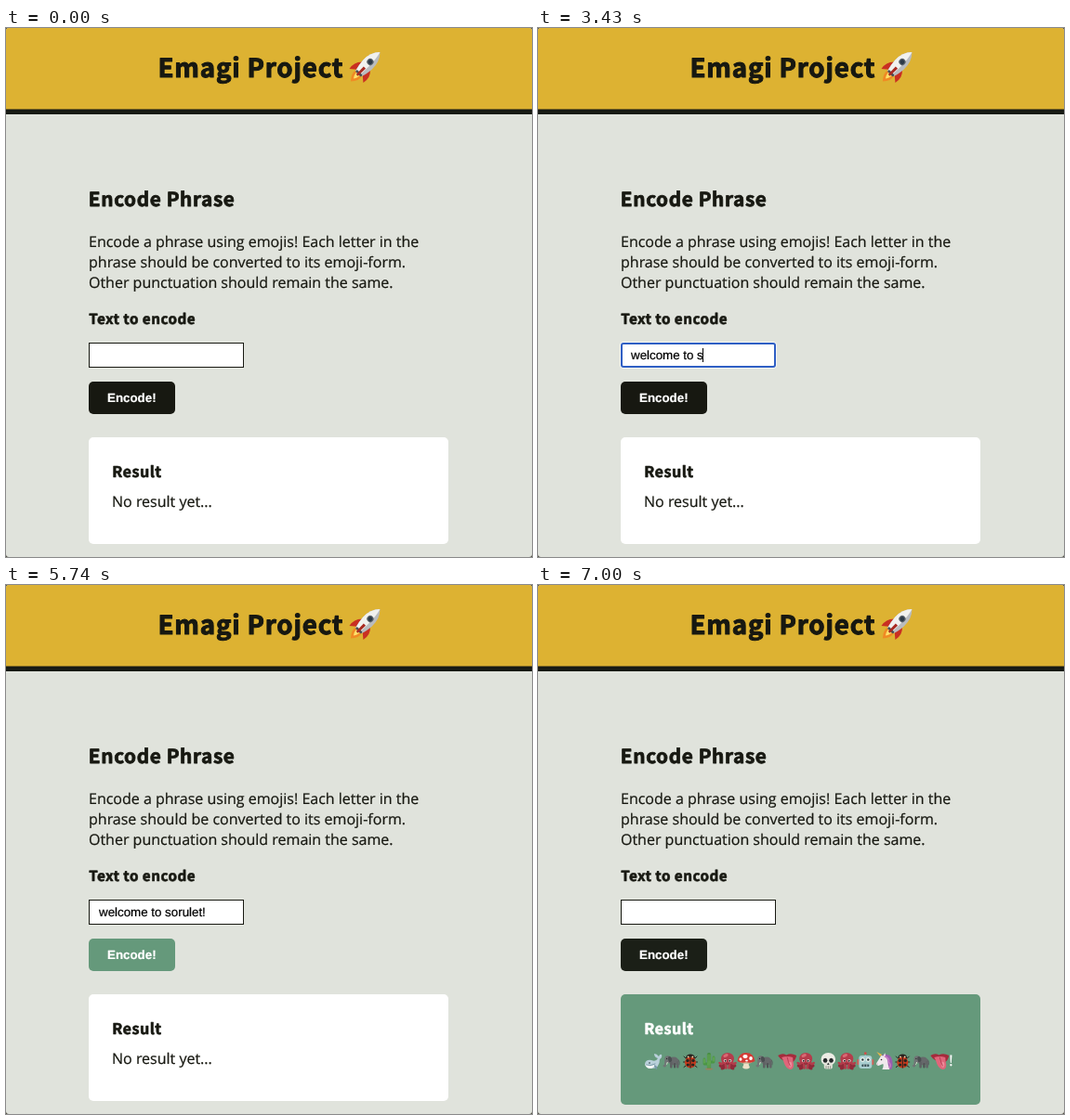
Recreate the animation shown at these times as an HTML page with a canvas. Size 566x570 px, loop 7.63 s.

```html
<!DOCTYPE html>
<html lang="en">
<head>
<meta charset="utf-8">
<title>Emagi Project</title>
<style>
  html, body { margin: 0; width: 100%; height: 100%; overflow: hidden; background: #e0e3dc; }
  canvas { display: block; width: 566px; height: 570px; }
</style>
</head>
<body>
<canvas id="stage" width="566" height="570"></canvas>
<script>
const ctx = document.getElementById('stage').getContext('2d');
ctx.textRendering = 'geometricPrecision';
ctx.lineCap = ctx.lineJoin = 'round';

const LOOP = 7630, TICK = 70;
const DARK = [23, 24, 17], GREEN = [101, 153, 123];
const INK = '#171811', SAGE = '#65997b';
const TITLE = '"Noto Sans CJK JP", "Noto Sans CJK SC", sans-serif';
const BODY = '16px "Open Sans", sans-serif';
const FORM = '13.333px "Liberation Sans", Arial, sans-serif';

const PHRASE = 'welcome to sorulet!';
const KEY_TIMES = [1820, 1960, 2100, 2240, 2380, 2730, 2870, 2940, 3080, 3220,
  3290, 3430, 3570, 3920, 4060, 4130, 4200, 4340, 5110];
const FOCUS = 980, BLUR = 5740, SUBMIT = 5810;
const BLINK = 490, FIRST_BLINK = 560;
const HOVER_IN = 5239, HOVER_OUT = 6785, FADE = 300;

const clamp = v => Math.min(1, Math.max(0, v));
const mix = (a, b, k) => `rgb(${a.map((v, i) => Math.round(v + (b[i] - v) * k))})`;

// CSS "ease": cubic-bezier(.25, .1, .25, 1), solved by bisection
function ease(p) {
  const bezier = (a, b, u) => 3 * a * u * (1 - u) ** 2 + 3 * b * u * u * (1 - u) + u ** 3;
  let lo = 0, hi = 1;
  for (let i = 0; i < 24; i++) {
    const mid = (lo + hi) / 2;
    if (bezier(.25, .25, mid) < p) lo = mid; else hi = mid;
  }
  return p >= 1 ? 1 : bezier(.1, 1, lo);
}

const fade = (t, from) => ease(clamp((t - from) / FADE));

function box(color, x, y, w, h, r = 0) {
  ctx.fillStyle = color;
  ctx.beginPath();
  ctx.roundRect(x, y, w, h, r);
  ctx.fill();
}

// A fine outline gives the text a fuller weight
function text(str, x, y, font, color = INK, outline = .22) {
  ctx.font = font;
  ctx.fillStyle = ctx.strokeStyle = color;
  ctx.lineWidth = outline;
  ctx.fillText(str, x, y);
  ctx.strokeText(str, x, y);
}

// Black weight: a bold face, thickened and spaced to suit
function title(str, x, y, size, color) {
  ctx.letterSpacing = size * .029 + 'px';
  text(str, x + size * .016, y - size * .012, `700 ${size * .965}px ${TITLE}`, color, size * .036);
  ctx.letterSpacing = '0px';
}

function oval(color, x, y, rx, ry = rx, turn = 0) {
  ctx.fillStyle = color;
  ctx.beginPath();
  ctx.ellipse(x, y, rx, ry, turn, 0, Math.PI * 2);
  ctx.fill();
}

function shape(color, d) {
  ctx.fillStyle = color;
  ctx.fill(new Path2D(d));
}

function line(color, width, d) {
  ctx.strokeStyle = color;
  ctx.lineWidth = width;
  ctx.stroke(new Path2D(d));
}

function at(x, y, draw, turn = 0, scale = 1) {
  ctx.save();
  ctx.translate(x, y);
  ctx.rotate(turn);
  ctx.scale(scale, scale);
  draw();
  ctx.restore();
}

// Each picture fits a 20px cell centred on the origin
const emoji = {
  w() {
    shape('#b9d0da', 'M-9 3Q-8-2-2-1Q3 1 5-3Q1-4 1-8Q4-8 6-5Q7-8 9-7Q10-4 7-2Q7 8-2 8Q-8 8-9 3Z');
    shape('#f3f6f6', 'M-9 3Q-4 6 2 4Q0 8-3 8Q-8 8-9 3Z');
    line('#5f8294', .7, 'M-8 4Q-3 6 2 3');
    oval('#26343b', -4, 2, .8);
    shape('#7898a8', 'M1 4Q5 5 4 9Q1 8 1 4Z');
  },
  e() {
    oval('#66696b', 2, 0, 5.6, 4.4);
    box('#5e6163', -2, 1, 2.6, 6.5, 1);
    box('#505355', 2, 2, 2.2, 5.5, 1);
    box('#626567', 5, 0, 2.6, 7.5, 1);
    oval('#717476', -4.2, -2, 3.5, 3.7);
    line('#717476', 1.9, 'M-6.5-1Q-7.5 3-7 5Q-7.5 6-8.5 5');
    oval('#4b4e51', -2, -2, 2, 3.1, -.2);
    line('#eee9da', .9, 'M-4.7 1.5Q-4.7 3-5.7 3.5');
    oval('#222', -5.4, -2.6, .6);
    line('#55595b', .8, 'M7.5-1Q9 1 8 4');
  },
  l() {
    line('#28231f', 1, 'M-5-3L-7-5M-5 1L-7.5 1M-5 5L-7 6.5M5-3L7-5M5 1L7.5 1M5 5L7 6.5');
    oval('#28231f', 0, -3.8, 4.8, 3.8);
    oval('#c93a1c', 0, 1.6, 6, 6);
    line('#28231f', 1.1, 'M0-4L0 7');
    for (const s of [-1, 1]) {
      oval('#28231f', s * 3, -.5, 1.7);
      oval('#28231f', s * 2.7, 4, 1.6);
      oval('#f0dfb0', s * 2.4, -4.6, .9);
    }
  },
  c() {
    line('#438b3f', 4.2, 'M0-7L0 7');
    line('#4b9645', 2.8, 'M0 3L-5 3L-5-2M0 1L5 1L5-4');
    line('#82bd68', .7, 'M-1-7L-1 7M1-7L1 7M-5-2L-5 2M5-4L5 0');
    oval('#9a815d', 0, 8.4, 4, 1);
  },
  o() {
    line('#8f2a39', 2.8, 'M-4 3Q-5 7-8 5M-2 4Q-3 8-6 8M2 4Q3 8 6 8M4 3Q5 7 8 5');
    line('#b23d4b', 2.6, 'M-5 2Q-7 4-8.5 2M5 2Q7 4 8.5 2M-2 4L-1.5 7.5M2 4L1.5 7.5');
    oval('#b53c4b', 0, -2.5, 7, 6.6);
    oval('#d96a74', -2, -6, 2.8, 1.6, -.4);
    for (const s of [-1, 1]) {
      oval('#f6e6e4', s * 2.6, -.4, 1.6);
      oval('#281c20', s * 2.4, -.2, 1);
    }
    line('#6a2230', .8, 'M-1.5 2.8Q0 3.7 1.5 2.8');
  },
  m() {
    shape('#ede0c7', 'M-3 0Q-2 4-4 7Q0 10 4 7Q2 4 3 0Z');
    oval('#c9b594', 0, 1, 6.5, 1.8);
    shape('#d53b35', 'M-9.5 0Q-8-9 0-9Q8-9 9.5 0Q5 3 0 1Q-5 3-9.5 0Z');
    oval('#fff', -1, -5, 2.6, 2.1);
    oval('#fff', -6, -2, 1.5, 1.8);
    oval('#fff', 5, -3, 1.8, 2.1);
    oval('#fff', .5, -.5, 1.4, .9);
  },
  t() {
    shape('#a52b3c', 'M-10-6Q-5-9-1-6.5Q4-9 10-6Q9-1 6 1Q-5 2-10-6Z');
    shape('#e0657a', 'M-6-4Q0-6 6-4Q6 0 7 4Q7 9 3 9Q-1 8-3 3Q-4-1-6-4Z');
    shape('#ee8d9b', 'M2 1Q5 0 5 4Q5 7 3 7Q1 5 2 1Z');
    line('#b23a50', .9, 'M0-4Q1 1 3 5');
  },
  s() {
    oval('#ecece5', 0, -2, 7.8, 7);
    box('#e1e1d8', -4.5, 2, 9, 6.5, 2);
    oval('#25282a', -3.2, -.8, 2.3, 2.5);
    oval('#25282a', 3.2, -.8, 2.3, 2.5);
    shape('#34383a', 'M0 1.5L-1.3 4L1.3 4Z');
    line('#73776f', .7, 'M-2.3 5.5L-2.3 8M0 5.5L0 8M2.3 5.5L2.3 8');
  },
  r() {
    line('#8aa5a8', 1.4, 'M0-6L0-8');
    oval('#d34c46', 0, -8.3, 1.4);
    box('#cc6057', -9, -2, 3, 6, 1);
    box('#cc6057', 6, -2, 3, 6, 1);
    box('#a8ced0', -7, -6, 14, 14, 3);
    oval('#eef5ee', -3, -1.5, 2.4);
    oval('#eef5ee', 3, -1.5, 2.4);
    oval('#293b40', -3, -1.5, 1.2);
    oval('#293b40', 3, -1.5, 1.2);
    box('#345158', -4, 3.5, 8, 2.6, 1);
    line('#e9efea', .7, 'M-1.5 3.8L-1.5 5.8M1.5 3.8L1.5 5.8');
  },
  u() {
    shape('#9a5db0', 'M-2-7Q8-9 9 0Q10 5 8 9L2 7Q5 0-1-5Z');
    shape('#f0e9ed', 'M-3-6Q3-6 4 0Q4 4 6 9L-2 9Q0 5-1 3L-6 5Q-9 4-8 2Z');
    shape('#e5b64a', 'M-4-5L-8-10L-2-7Z');
    shape('#f0e9ed', 'M-1-5L1-9L2-4Z');
    line('#c77cc4', 1.5, 'M1-5Q6-3 5 1Q8 4 6 7');
    oval('#2b2328', -2.8, -1.5, .8);
    oval('#c596a3', -7, 3, .6);
  }
};

function rocket() {
  shape('#f08a24', 'M-4 9Q-6 15 0 21Q6 15 4 9Z');
  shape('#ffe16a', 'M-2 9Q-3 13 0 17Q3 13 2 9Z');
  shape('#c92f22', 'M-5-2Q-12 4-10 13L-4 8ZM5-2Q12 4 10 13L4 8Z');
  shape('#b9bcbf', 'M0-21Q7-14 6.5-3Q6 5 4 10L-4 10Q-6 5-6.5-3Q-7-14 0-21Z');
  shape('#f1f1ef', 'M0-21Q3-12 2 10L-4 10Q-6 4-6.5-3Q-7-14 0-21Z');
  oval('#5c646b', 0, -7, 3.4);
  oval('#2c3a48', 0, -7, 2.3);
  box('#4b5055', -4, 8, 8, 2.5, 1);
  shape('#a82a22', 'M-1.5 1L1.5 1L1.2 12L-1.2 12Z');
}

function drawPage() {
  box('#464438', 0, 0, 566, 570);
  box('#e0e3dc', 0, 0, 566, 570, 3);
  box('#ddb232', 0, 0, 566, 88, [3, 3, 0, 0]);
  box('#171a14', 0, 87.6, 566, 5.4);
  title('Emagi Project', 163, 53, 28.65);
  at(386.7, 41.8, rocket, Math.PI / 4, 1.06);

  title('Encode Phrase', 88.5, 192, 21.5);
  const lines = ['Encode a phrase using emojis! Each letter in the',
    'phrase should be converted to its emoji-form.',
    'Other punctuation should remain the same.'];
  lines.forEach((str, i) => text(str, 89, 236 + i * 22, BODY));
  title('Text to encode', 89, 319, 15.8);
}

function caretVisible(t, keys) {
  const last = keys.length ? keys[keys.length - 1] : FOCUS;
  const period = keys.length ? BLINK : FIRST_BLINK;
  return Math.floor((t - last) / period) % 2 === 0;
}

function drawInput(t) {
  const focused = t >= FOCUS && t < BLUR;
  if (focused) {
    box('#f4f6f5', 88, 338, 169, 29, 4);
    box('#2f5fc4', 89, 339, 167, 27, 3);
    box('#fff', 91, 341, 163, 23, 1);
  } else {
    box(INK, 89, 339, 167, 27);
    box('#fff', 90, 340, 165, 25);
  }
  if (t >= SUBMIT) return;
  const keys = KEY_TIMES.filter(k => t >= k);
  const typed = PHRASE.slice(0, keys.length);
  text(typed, 100, 357, FORM, '#000');
  if (focused && caretVisible(t, keys)) {
    box('#000', Math.floor(100 + ctx.measureText(typed).width), 345, 1, 15);
  }
}

function drawButton(t) {
  const hover = fade(t, HOVER_IN) - fade(t, HOVER_OUT);
  box(mix(DARK, GREEN, hover), 89, 381, 93, 35, 5);
  text('Encode!', 109, 403, 'bold ' + FORM, '#fff');
}

function drawResult(t) {
  const done = t >= SUBMIT;
  box(done ? SAGE : '#fff', 89, 441, 387, done ? 119 : 115, 5);
  title('Result', 114, 484, 16.76, done ? '#fff' : INK);
  if (!done) {
    text('No result yet...', 114, 516, BODY);
    return;
  }
  let x = 114;
  for (const ch of PHRASE) {
    if (emoji[ch]) {
      at(x + 10, 513, emoji[ch]);
      x += 20;
    } else {
      text(ch, x, 518, BODY, '#fff');
      x += ctx.measureText(ch).width;
    }
  }
}

const start = performance.now();
function frame() {
  const now = (performance.now() - start) % LOOP;
  const t = Math.floor(now / TICK) * TICK;
  drawPage();
  drawInput(t);
  drawButton(t);
  drawResult(t);
  requestAnimationFrame(frame);
}
frame();
</script>
</body>
</html>
```
